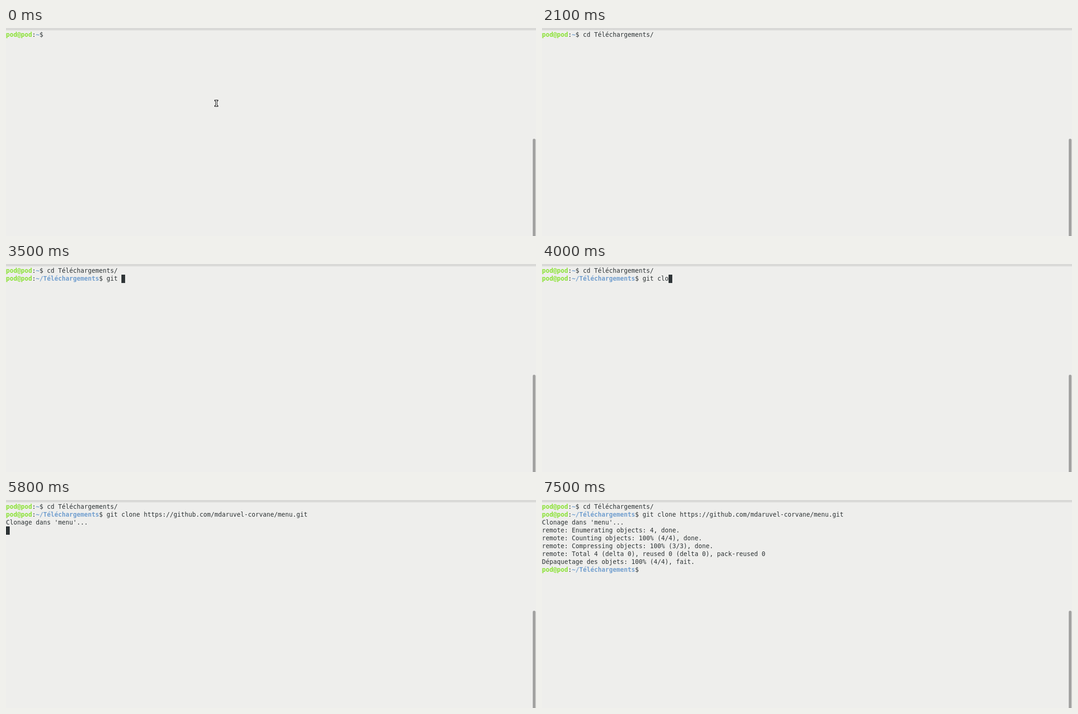
Recreate the animation shown at these times as an HTML page with a canvas. Size 1139 px wide and 449 px high, loop 8 s.

```html
<!DOCTYPE html>
<html lang="fr">
<head>
<meta charset="utf-8">
<title>Terminal</title>
<style>
  html, body { margin: 0; width: 100%; height: 100%; overflow: hidden; background: #eeeeec; }
  canvas { display: block; }
</style>
</head>
<body>
<canvas id="stage" width="1139" height="449"></canvas>
<script>
const ctx = document.getElementById('stage').getContext('2d');
const LOOP = 8000;
const CELL_W = 8, CELL_H = 17, TOP = 6, BASELINE = 13;
const FONT = '13.333px "DejaVu Sans Mono", monospace';
const INK = '#2e3436', GREEN = '#8ae234', BLUE = '#729fcf', PAPER = '#eeeeec';

const USER = 'pod@pod';
const prompt = dir => `${USER}:${dir}$ `;
const HOME = prompt('~'), DOWNLOADS = prompt('~/Téléchargements');

const CLONE_OUTPUT = [
  'remote: Enumerating objects: 4, done.',
  'remote: Counting objects: 100% (4/4), done.',
  'remote: Compressing objects: 100% (3/3), done.',
  'remote: Total 4 (delta 0), reused 0 (delta 0), pack-reused 0',
  'Dépaquetage des objets: 100% (4/4), fait.',
  DOWNLOADS
].join('\n');

// [time in ms, text appended, cursor visible]
const EVENTS = [
  [0, HOME, false],
  [400, 'c', true],
  [500, 'd', true],
  [800, ' ', true],
  [1300, 'T', true],
  [1500, 'éléchargements/', true],
  [2100, '', false],
  [2300, '', true],
  [2400, '\n' + DOWNLOADS, true],
  [2900, '', false],
  [3100, 'g', true],
  [3200, 'i', true],
  [3300, 't', true],
  [3500, ' ', true],
  [3700, 'c', true],
  [3800, 'l', true],
  [4000, 'o', true],
  [4200, 'n', true],
  [4300, 'e', true],
  [4600, ' ', true],
  [5200, 'https://github.com/mdaruvel-corvane/menu.git', true],
  [5600, '\n', true],
  [5700, "Clonage dans 'menu'...", true],
  [5800, '\n', true],
  [6300, '', false],
  [6900, '', true],
  [7200, CLONE_OUTPUT, true],
  [7500, '', false]
];
const POINTER_HIDDEN = 400;

function rect(color, x, y, w, h) {
  ctx.fillStyle = color;
  ctx.fillRect(x, y, w, h);
}

// Each character sits on the whole-pixel cell grid.
function drawText(text, col, row, color = INK, bold = false) {
  ctx.font = (bold ? 'bold ' : '') + FONT;
  ctx.fillStyle = color;
  [...text].forEach((ch, i) =>
    ctx.fillText(ch, (col + i) * CELL_W, TOP + row * CELL_H + BASELINE));
}

function drawLine(line, row) {
  if (!line.startsWith(USER)) return drawText(line, 0, row);
  const colon = USER.length, end = line.indexOf('$');
  drawText(USER, 0, row, GREEN, true);
  drawText(':', colon, row);
  drawText(line.slice(colon + 1, end), colon + 1, row, BLUE, true);
  drawText(line.slice(end), end, row);
}

function drawPointer() {
  rect('#000', 448, 155, 8, 3);
  rect('#000', 448, 167, 8, 3);
  rect('#000', 450, 155, 4, 15);
  rect('#fff', 449, 156, 6, 1);
  rect('#fff', 449, 168, 6, 1);
  rect('#fff', 451, 156, 2, 13);
}

function drawFrame() {
  rect(PAPER, 0, 0, 1139, 449);
  rect('#d9d9d7', 0, 0, 1139, 5);
  ctx.fillStyle = '#a2a2a1';
  ctx.beginPath();
  ctx.roundRect(1132, 239, 6, 220, 3);
  ctx.fill();
}

function render(time) {
  const past = EVENTS.filter(event => event[0] <= time);
  const lines = past.map(event => event[1]).join('').split('\n');
  const cursorOn = past[past.length - 1][2];
  const row = lines.length - 1;

  drawFrame();
  lines.forEach(drawLine);
  if (cursorOn) rect(INK, lines[row].length * CELL_W, TOP + row * CELL_H, CELL_W, CELL_H + 1);
  if (time < POINTER_HIDDEN) drawPointer();
}

function tick() {
  render(performance.now() % LOOP);
  requestAnimationFrame(tick);
}
tick();
</script>
</body>
</html>
```
